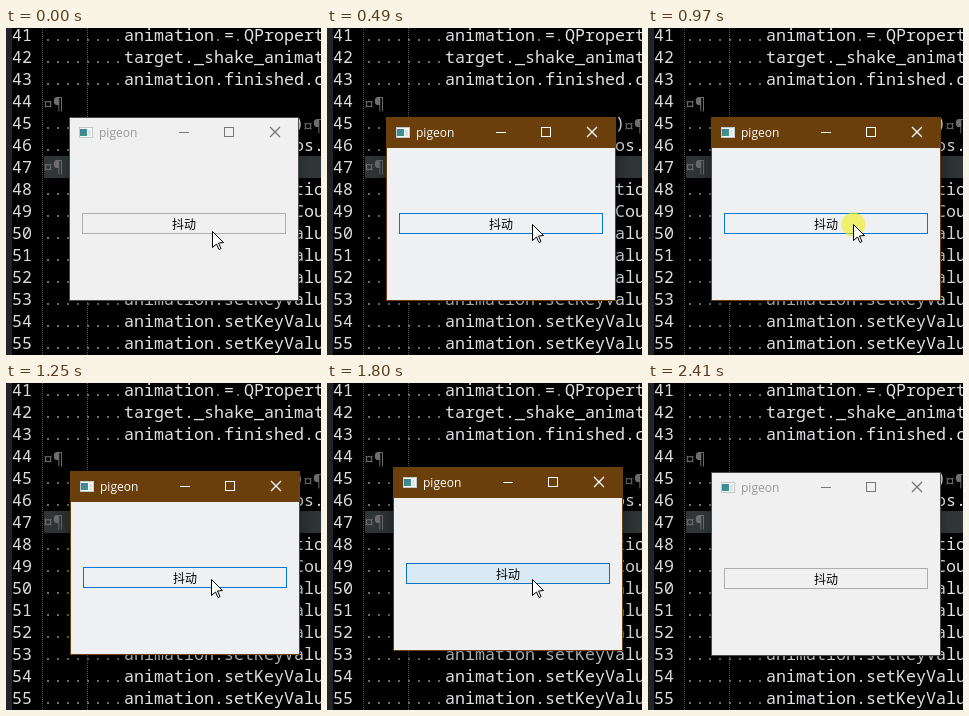
These frames come from a looping animation (315 px wide and 327 px high, 2480 ms). An HTML page with a canvas:

```html
<!DOCTYPE html>
<html lang="zh">
<head>
<meta charset="utf-8">
<style>
  html, body { margin: 0; width: 100%; height: 100%; overflow: hidden; background: #000; }
  canvas { display: block; }
</style>
</head>
<body>
<canvas id="stage" width="315" height="327"></canvas>
<script>
const ctx = document.getElementById('stage').getContext('2d');
const LOOP = 2480, STEP = 70, ROW = 22, CELL = 10, LEFT = 38, CURRENT_ROW = 6;
const CODE_FONT = '16.667px "Noto Sans Mono", monospace';
const MARK = '#6e6e6e';

const lines = [
  'animation = QPropert', 'target._shake_animati', 'animation.finished.c',
  '', 'pos = target.pos()¤¶', 'x, y = pos.x(), pos.', '',
  'animation.setDuratio', 'animation.setLoopCou',
  ...Array(6).fill('animation.setKeyValu')
];

// Bursts of steps separated by still pauses: [start, last step]
const bursts = [[0, 770], [970, 1460], [1660, 2150], [2410, 2410]];
const pressStarts = [210, 970, 1660];
const shakeStarts = [313, 1041, 1753];
const SHAKE_CYCLE = 200, SHAKE_LENGTH = 395;
const shakeX = [[0, 0], [.18, 4], [.72, -8], [.99, -2], [1, 0]];
const shakeY = [[0, 0], [.45, -10], [.99, 2], [1, 0]];
const cursorX = [[0, 206], [140, 205], [1870, 205], [2080, 208]];
const cursorY = [[0, 203], [140, 196], [1870, 196], [1940, 214], [2010, 252], [2080, 302]];

function rect(x, y, w, h, color) {
  ctx.fillStyle = color;
  ctx.fillRect(x, y, w, h);
}

function frame(x, y, w, h, color) {
  ctx.strokeStyle = color;
  ctx.lineWidth = 1;
  ctx.strokeRect(x + .5, y + .5, w - 1, h - 1);
}

function text(string, x, y, font, color) {
  ctx.font = font;
  ctx.fillStyle = color;
  ctx.fillText(string, x, y);
}

function polygon(points) {
  ctx.beginPath();
  points.forEach(([x, y]) => ctx.lineTo(x, y));
  ctx.closePath();
}

function interpolate(keys, t) {
  const i = keys.findIndex(key => key[0] > t);
  if (i < 0) return keys[keys.length - 1][1];
  if (i === 0) return keys[0][1];
  const [t0, v0] = keys[i - 1], [t1, v1] = keys[i];
  return v0 + (v1 - v0) * (t - t0) / (t1 - t0);
}

function quantize(t) {
  const [start, last] = bursts.filter(b => b[0] <= t).pop();
  return Math.min(start + Math.floor((t - start) / STEP) * STEP, last);
}

function shakeOffset(t) {
  const start = shakeStarts.find(s => t >= s && t < s + SHAKE_LENGTH);
  if (start === undefined) return [0, 0];
  const phase = (t - start) % SHAKE_CYCLE / SHAKE_CYCLE;
  return [shakeX, shakeY].map(keys => Math.round(interpolate(keys, phase)));
}

function drawLine(line, row) {
  const base = 13 + row * ROW;
  const markBase = row === CURRENT_ROW ? base : base + 3;
  text(41 + row, 6, base, CODE_FONT, '#dcdcdc');
  const cells = line ? ' '.repeat(8) + line : '¤¶';
  [...cells].forEach((char, k) => {
    const x = LEFT + k * CELL;
    if (char === ' ') rect(x + 3, base - 2, 2, 2, MARK);
    else if ('¤¶'.includes(char)) text(char, x - 1, markBase, CODE_FONT, MARK);
    else text(char, x, base, CODE_FONT, '#e0e2e4');
  });
}

function drawEditor() {
  rect(0, 0, 315, 327, '#000');
  rect(0, 0, 6, 327, '#202427');
  rect(LEFT, 128, 277, ROW, '#303638');
  for (let y = 0; y < 327; y += 2) {
    rect(36, y, 1, 1, '#555');
    rect(81, y, 1, 1, '#5a5a5a');
  }
  lines.forEach(drawLine);
}

function drawIcon() {
  rect(73, 99, 14, 11, '#f8fafa');
  frame(73, 99, 14, 11, '#c2c9cb');
  const fill = ctx.createLinearGradient(74, 101, 81, 108);
  fill.addColorStop(0, '#3f7fa0');
  fill.addColorStop(1, '#3f9a80');
  rect(74, 101, 7, 7, fill);
  rect(82, 102, 3, 6, '#dfe4e6');
}

function drawButton(t, body) {
  let fill = body, border = '#adadad';
  if (t >= 70 && t < 1660) border = '#0078d7';
  else if (t >= 1660 && t < 2010) [fill, border] = ['#d9e9f6', '#0871bd'];
  rect(76, 185, 204, 21, fill);
  frame(76, 185, 204, 21, border);
  text('抖动', 166, 201, '500 12px "Noto Sans CJK SC", "Noto Sans CJK", sans-serif', '#000');
}

function drawWindow(t) {
  const active = t >= 210 && t < 2410;
  const body = !active ? '#f0f0f0' : t < 1660 ? '#eef0f2' : t < 2150 ? '#f0f0f0' : '#ededed';
  const ink = active ? '#fff' : '#777';
  ctx.save();
  ctx.translate(...shakeOffset(t));

  ctx.save();
  ctx.shadowColor = active ? 'rgba(0,0,0,.5)' : 'rgba(0,0,0,.3)';
  ctx.shadowBlur = active ? 18 : 10;
  ctx.shadowOffsetY = 4;
  rect(63, 89, 230, 184, active ? '#6b3f0b' : '#4a4a4a');
  ctx.restore();

  if (!active) rect(64, 90, 228, 30, body);
  rect(64, 120, 228, 152, body);
  drawIcon();
  text('pigeon', 93, 109, '500 12px "Open Sans", sans-serif', active ? '#fff' : '#999');
  rect(173, 104, 10, 1, ink);
  frame(218, 99, 10, 10, ink);
  ctx.lineWidth = 1.3;
  ctx.beginPath();
  ctx.moveTo(264, 99); ctx.lineTo(274, 109);
  ctx.moveTo(274, 99); ctx.lineTo(264, 109);
  ctx.stroke();
  drawButton(t, body);
  ctx.restore();
}

function drawPointer(t) {
  if (t >= 2150) return;
  if (pressStarts.some((press, i) => t >= press && t < shakeStarts[i])) {
    ctx.fillStyle = 'rgba(240,240,20,.6)';
    ctx.beginPath();
    ctx.arc(205.5, 196.5, 12, 0, Math.PI * 2);
    ctx.fill();
  }
  const x = Math.round(interpolate(cursorX, t)), y = Math.round(interpolate(cursorY, t));
  ctx.save();
  ctx.translate(x + .5, y + .5);
  polygon([[0, 0], [0, 16], [4, 12.5], [6.5, 18], [8.5, 17], [6, 11.5], [11, 11]]);
  ctx.fillStyle = '#fff';
  ctx.fill();
  ctx.strokeStyle = '#000';
  ctx.lineWidth = 1;
  ctx.stroke();
  ctx.restore();
}

function render(now) {
  const t = quantize(now % LOOP);
  drawEditor();
  drawWindow(t);
  drawPointer(t);
}

const startTime = performance.now();
function tick() {
  render(performance.now() - startTime);
  requestAnimationFrame(tick);
}
tick();
</script>
</body>
</html>
```
